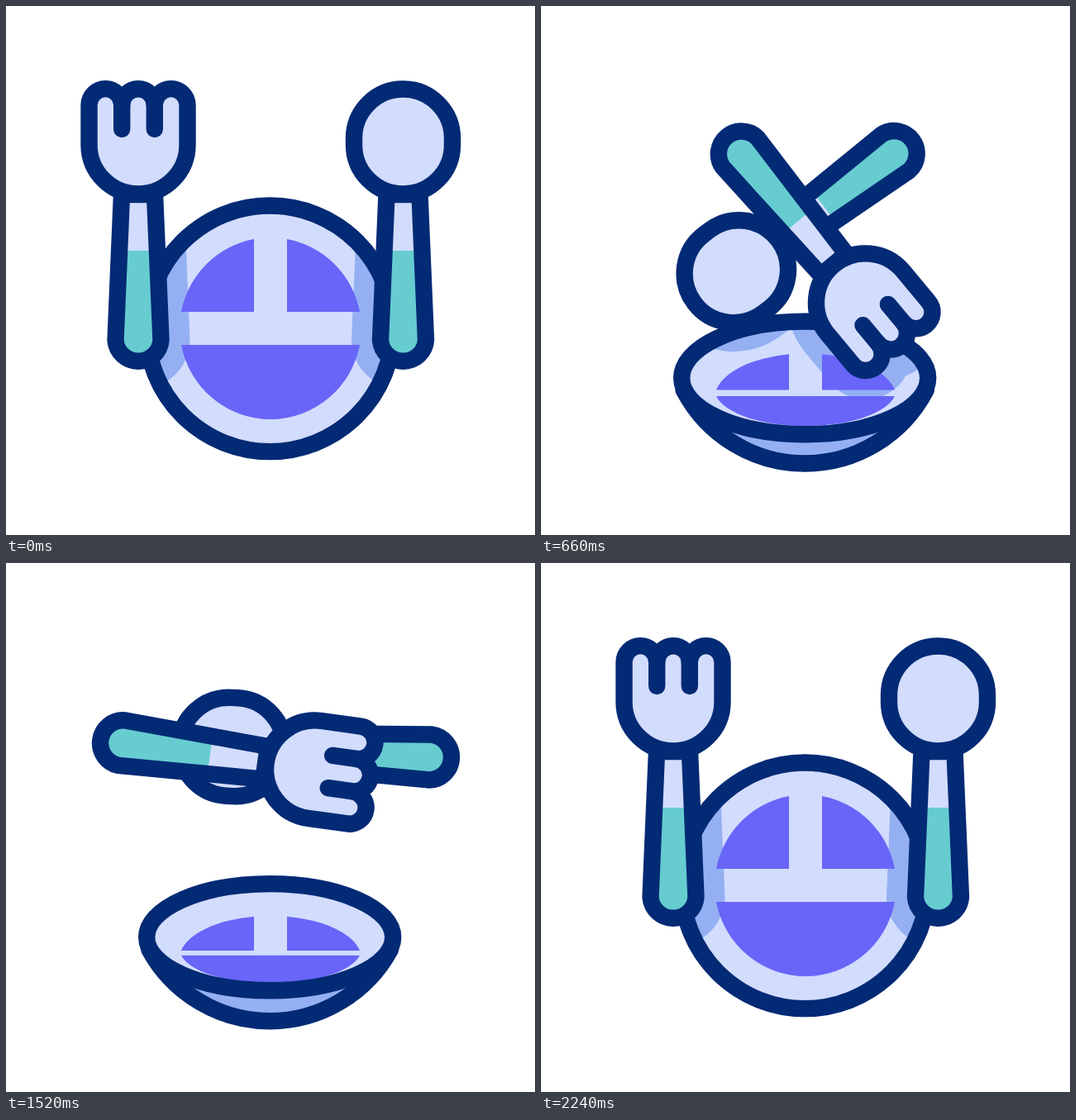
Recreate the animation shown at these times as an HTML page. Size 640 px wide and 640 px high, loop 2400 ms.

```html
<!DOCTYPE html>
<html lang="en">
<head>
<meta charset="utf-8">
<title>Plate, fork and spoon</title>
<style>
  html, body { margin: 0; width: 100%; height: 100%; overflow: hidden; background: #fff; }
  svg { display: block; width: 100%; height: 100%; }
  .line { stroke: #032a75; stroke-width: 20.4; stroke-linejoin: round; stroke-linecap: round; }
  .shade { fill: #94b0f3; stroke: #94b0f3; stroke-width: 70; stroke-linejoin: round; }
  .pale { fill: #d2dcfd; }
  .none { fill: none; }
</style>
</head>
<body>
<svg viewBox="0 0 640 640">
  <defs>
    <path id="handle" d="M-20-38.5L-27.5 138A27.6 27.6 0 0 0 27.5 138L20-38.5Z"/>
    <path id="grip" d="M-22.9 29.5L-27.5 138A27.6 27.6 0 0 0 27.5 138L22.9 29.5Z"/>
    <path id="forkHead" d="M-59.5-146.5a19.8 19.8 0 0 1 39.7 0a19.8 19.8 0 0 1 39.6 0a19.8 19.8 0 0 1 39.7 0V-98.5a59.5 59.5 0 0 1-119 0Z"/>
    <path id="spoonHead" d="M-59.5-106.5a59.5 59.5 0 0 1 119 0v8a59.5 59.5 0 0 1-119 0Z"/>
    <clipPath id="dish"><ellipse class="oval" cx="319.2" rx="149"/></clipPath>
  </defs>

  <path id="bowl" class="line" fill="#94b0f3"/>
  <ellipse class="oval pale" cx="319.2" rx="149"/>
  <g clip-path="url(#dish)">
    <g class="spoon shade"><use href="#handle"/><use href="#spoonHead"/></g>
    <g class="fork shade"><use href="#handle"/><use href="#forkHead"/></g>
    <path id="food" fill="#6865f8"/>
  </g>
  <ellipse class="oval line none" cx="319.2" rx="149"/>

  <path id="sparks" fill="none" stroke="#ffca4f" stroke-linecap="round"/>

  <g class="spoon">
    <use href="#handle" class="pale"/>
    <use href="#grip" fill="#66ccd0"/>
    <use href="#handle" class="line none"/>
    <use href="#spoonHead" class="line pale"/>
  </g>
  <g class="fork">
    <use href="#handle" class="pale"/>
    <use href="#grip" fill="#66ccd0"/>
    <use href="#handle" class="line none"/>
    <use href="#forkHead" class="line pale"/>
    <path class="line none" d="M-19.8-146.5V-117.5M19.8-146.5V-117.5"/>
  </g>
</svg>
<script>
const LOOP = 2400;
const all = s => document.querySelectorAll(s);
const byId = id => document.getElementById(id);
const set = (list, name, value) => list.forEach(el => el.setAttribute(name, value));

const ovals = all('.oval'), forks = all('.fork'), spoons = all('.spoon');
const bowl = byId('bowl'), food = byId('food'), sparks = byId('sparks');

const clamp = u => Math.max(0, Math.min(1, u));
const smooth = u => u * u * (3 - 2 * u);
const POW = 3.5;
const half = u => Math.pow(2 * u, POW) / 2;
const steep = u => u < 0.5 ? half(u) : 1 - half(1 - u);

// Each key: time, x, lift, angle
const forkKeys = [
  [0, 160, 0, 0], [310, 113.5, -38, -15.1], [750, 355, 99, 158.6],
  [1060, 348, 66, 158.6], [1240, 348, 66, 158.6], [1907, 160, 0, 0]
];
const spoonKeys = [
  [0, 480.5, 0, 0], [310, 532.5, -57, 18.1], [750, 293, 75, -144],
  [1060, 311, 52, -141], [1240, 311, 52, -141], [1907, 480.5, 0, 0]
];

function pose(keys, t) {
  let i = 0;
  while (i < keys.length - 2 && t > keys[i + 1][0]) i++;
  const a = keys[i], b = keys[i + 1];
  const s = smooth(clamp((t - a[0]) / (b[0] - a[0])));
  return a.map((v, k) => v + (b[k] - v) * s);
}

function place(list, keys, t, tilt) {
  const [, x, lift, angle] = pose(keys, t);
  const y = 266.5 - 83 * tilt + lift;
  set(list, 'transform', `translate(${x} ${y}) rotate(${angle})`);
}

function drawDish(p) {
  const cy = 390.3 + 73.2 * p;
  set(ovals, 'cy', cy);
  set(ovals, 'ry', 148.8 - 98.8 * p);

  const r = 149 + 20 * p, mid = 389.3 - 1.3 * p, rim = cy + 18 * p;
  const dx = Math.sqrt(Math.max(0, r * r - (rim - mid) ** 2));
  bowl.setAttribute('d', `M${319.2 - dx} ${rim}A${r} ${r} 0 0 0 ${319.2 + dx} ${rim}Z`);

  const top = 282 + 171 * p, base = 370 + 116 * p, low = 410 + 76 * p;
  const ry = (base - top) / 0.793, depth = (90 - 66 * p) / 0.81;
  food.setAttribute('d',
    `M212 ${base}A110 ${ry} 0 0 1 300 ${top}V${base}Z` +
    `M428 ${base}A110 ${ry} 0 0 0 340 ${top}V${base}Z` +
    `M212 ${low}A110 ${depth} 0 0 0 428 ${low}Z`);
}

function drawSparks(t) {
  const u = (t - 1020) / 280;
  if (u <= 0 || u >= 1) {
    sparks.setAttribute('d', '');
    return;
  }
  const wave = Math.sin(Math.PI * u), shift = 18 * (u - 0.5);
  const ray = (angle, dist) => {
    const c = Math.cos(angle), s = Math.sin(angle);
    const at = r => `${253.2 + r * c} ${220.2 - r * s}`;
    const r = dist + shift;
    return `M${at(r - 5 * wave)}L${at(r + 5 * wave)}`;
  };
  sparks.setAttribute('d', ray(Math.PI, 75.4) + ray(Math.PI * 0.75, 81.5) + ray(Math.PI / 2, 73.7));
  sparks.setAttribute('stroke-width', 20 * Math.min(1, 3 * wave));
}

function draw(t) {
  const tilt = t < 1100 ? steep(clamp(t / 1060)) : 1 - steep(clamp((t - 1140) / 1080));
  drawDish(tilt);
  drawSparks(t);
  place(forks, forkKeys, t, tilt);
  place(spoons, spoonKeys, t, tilt);
}

const start = performance.now();
function tick() {
  draw((performance.now() - start) % LOOP);
  requestAnimationFrame(tick);
}
draw(0);
requestAnimationFrame(tick);
</script>
</body>
</html>
```
